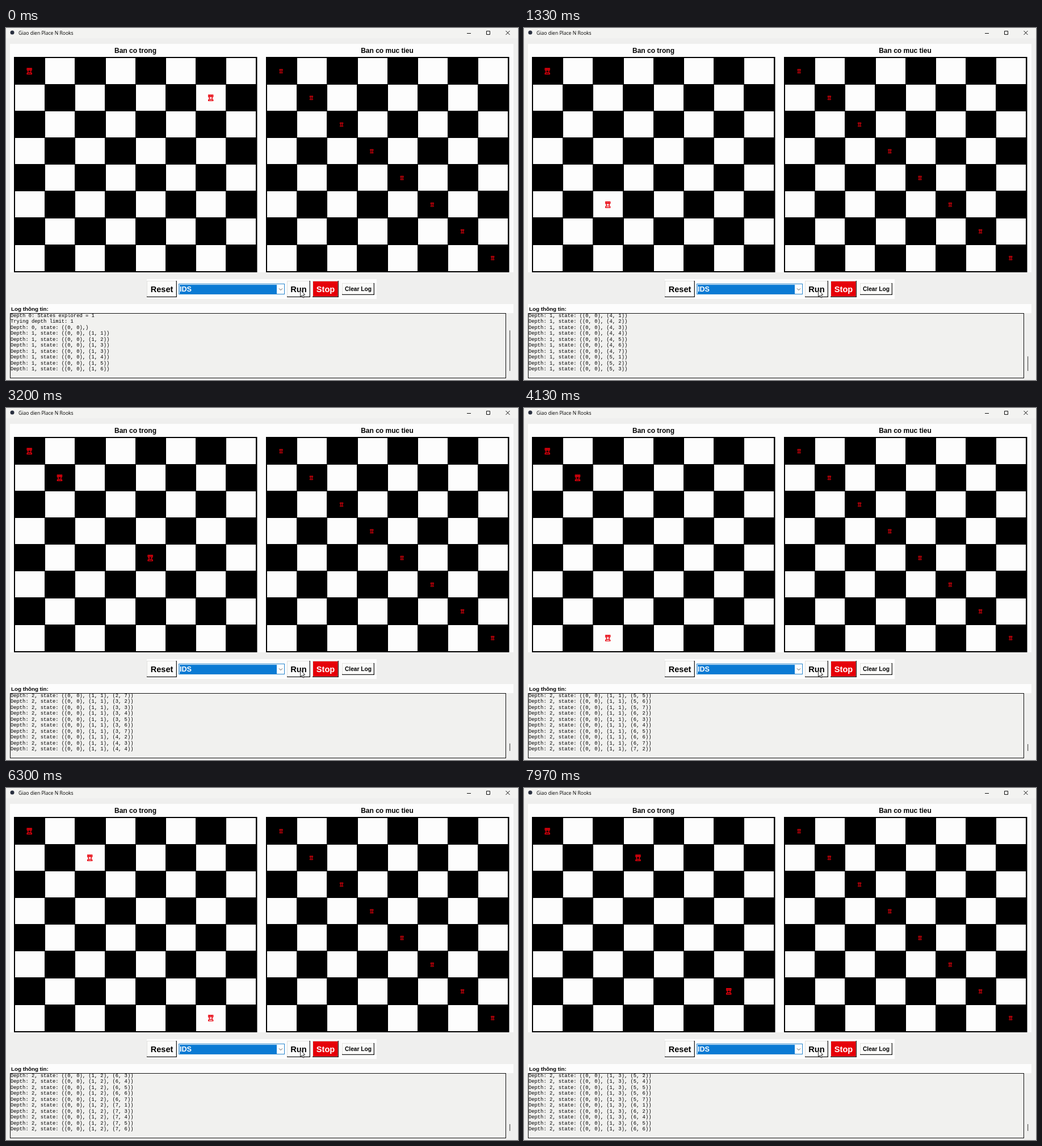
An HTML page for the animation above (8 s loop, 902 by 621 pixels).

```html
<!DOCTYPE html>
<html lang="vi">
<head>
<meta charset="utf-8">
<title>Giao dien Place N Rooks</title>
<style>
  html, body { margin: 0; width: 100%; height: 100%; overflow: hidden; background: #efefee; }
  svg { display: block; width: 902px; height: 621px; }
  text { font: bold 12px "Liberation Sans", Arial, sans-serif; }
  .big { font-size: 14.6px; }
  .title { font: 8.6px "Open Sans", sans-serif; }
  #log text { font: 8.8px "Liberation Mono", monospace; }
  .mid { text-anchor: middle; }
  .line { fill: none; stroke: #111; }
</style>
</head>
<body>
<svg viewBox="0 0 902 621">
  <defs>
    <clipPath id="logClip"><rect x="8" y="504" width="872" height="113"/></clipPath>
    <path id="rook" fill="none" stroke="#e8000c" stroke-width="1.4"
      d="M-4-4.8v2.8l1.5 1.2v3.4l-1.5 1.2v1.4h8v-1.4l-1.5-1.2v-3.4l1.5-1.2v-2.8h-2v1.3h-1v-1.3h-2v1.3h-1v-1.3zM-3.5-1.8h7M-2.5 2.6h5"/>
  </defs>
  <rect width="902" height="621" fill="#efefee"/>
  <rect width="902" height="18" fill="#f3f3f1"/>
  <circle cx="11" cy="8" r="3.5" fill="#2a3040"/>
  <text class="title" x="22" y="12">Giao dien Place N Rooks</text>
  <path class="line" d="M812 9.5h7M846.5 5.5h6v6h-6zM880.5 5l7 7m0-7l-7 7"/>

  <g fill="#fdfdfd">
    <rect x="7" y="28" width="887" height="403"/>
    <rect x="248" y="443" width="405" height="35"/>
    <rect x="7" y="487" width="887" height="16"/>
  </g>
  <text class="mid" x="228" y="43.5">Ban co trong</text>
  <text class="mid" x="671.5" y="43.5">Ban co muc tieu</text>
  <g id="boards"></g>
  <g id="rooks"></g>

  <g id="buttons"></g>
  <rect x="304.5" y="451.5" width="186" height="18" fill="#fff" stroke="#2584cc"/>
  <rect x="306" y="453" width="171" height="16" fill="#0a7ad4"/>
  <text x="306" y="465" fill="#fff" style="font-size:12.6px">IDS</text>
  <path class="line" d="M481 459.5l3 3l3-3" style="stroke:#555"/>
  <path d="M518.5 462v12.2l2.7-2.5l2 4.3l2-.9l-2-4.2h3.7z" fill="#fff" stroke="#111" stroke-width=".9"/>

  <text x="9" y="498.5" style="font-size:9.8px">Log thông tin:</text>
  <rect x="7.5" y="503.5" width="873" height="114" fill="#f1f1ef" stroke="#111"/>
  <g id="log" clip-path="url(#logClip)"></g>
  <rect id="thumb" x="887" width="1.2" fill="#555"/>
</svg>
<script>
const LOOP = 8000;
const LINE_HEIGHT = 10.5;
const BOARD_LAG = 0.3; // the board redraws shortly after the log line appears
// Search progress: [time in ms, step number]
const PACE = [[0, 5.4], [1330, 30.05], [2170, 45.6], [3200, 65.3], [3300, 66],
  [5000, 98.6], [6300, 122.3], [6370, 123], [8000, 154.1]];
const $ = id => document.getElementById(id);
const range = (from, to) => Array.from({ length: to - from }, (_, i) => from + i);

function rookAt([row, col], left, scale = 1) {
  return `<use href="#rook" transform="translate(${left + 53.25 * col} ${76 + 47.1 * row}) scale(${scale})"/>`;
}

function drawBoard(left) {
  let out = `<rect x="${left}" y="51" width="428.5" height="380"/>`;
  for (const row of range(0, 8)) for (const col of range(0, 8)) {
    if ((row + col) % 2 === 0) continue;
    const x = Math.round(left + 2 + 53.2 * col), y = Math.round(52.9 + 47.1 * row);
    out += `<rect x="${x}" y="${y}" width="52" height="46" fill="#fdfdfd"/>`;
  }
  return out;
}

function button(x, y, w, h, label, size, face = "#fbfbfa", ink = "#000") {
  return `<rect x="${x}" y="${y}" width="${w}" height="${h}" fill="#e2e2df"/>
    <path d="M${x} ${y + h}h${w}v${-h}h-1.5v${h - 1.5}h${1.5 - w}z" fill="#222"/>
    <rect x="${x + 1}" y="${y + 1}" width="${w - 2.5}" height="${h - 2.5}" fill="${face}"/>
    <text class="mid" x="${x + w / 2}" y="${y + h / 2 + size * 0.36}" fill="${ink}" style="font-size:${size}px">${label}</text>`;
}

// Iterative deepening: every visited state is one step and one log line.
const lines = [], steps = [];
function visit(state) {
  const cells = state.map(([r, c]) => `(${r}, ${c})`).join(", ");
  lines.push(`Depth: ${state.length - 1}, state: (${cells}${state.length === 1 ? "," : ""})`);
  steps.push({ state, lineCount: lines.length });
}
function search(state, limit) {
  visit(state);
  if (state.length > limit) return;
  for (const row of range(state.at(-1)[0] + 1, 8)) for (const col of range(0, 8)) {
    if (!state.some(([, used]) => used === col)) search([...state, [row, col]], limit);
  }
}
for (const limit of range(0, 3)) {
  const before = steps.length;
  lines.push(`Trying depth limit: ${limit}`);
  search([[0, 0]], limit);
  lines.push(`Depth ${limit}: States explored = ${steps.length - before}`);
}
// The log repeats one line early on.
const repeated = lines.findIndex(line => line.includes("(1, 3)"));
lines.splice(repeated, 0, lines[repeated]);
for (const step of steps) if (step.lineCount > repeated) step.lineCount++;
const FIRST = 2; // steps before the first depth-1 state

function progress(time) {
  const i = PACE.findIndex(([t]) => t > time);
  const [t0, s0] = PACE[i - 1], [t1, s1] = PACE[i];
  return FIRST + s0 + (s1 - s0) * (time - t0) / (t1 - t0);
}

function drawLog(count) {
  $("log").innerHTML = lines.slice(count - 10, count).map((line, i) =>
    `<text x="8" y="${604 - LINE_HEIGHT * (9 - i)}">${line}</text>`).join("");
  const height = Math.max(12, 91 * 11 / (count + 2));
  $("thumb").setAttribute("y", 605 - height);
  $("thumb").setAttribute("height", height);
}

function drawRooks(state) {
  $("rooks").innerHTML = state.map(cell => rookAt(cell, 41.2)).join("") +
    range(0, 8).map(i => rookAt([i, i], 484.6, 0.66)).join("");
}

$("boards").innerHTML = drawBoard(14) + drawBoard(458);
$("buttons").innerHTML = button(248, 446, 53, 29, "Reset", 14.6) +
  button(495, 446, 41, 29, "Run", 14.6) +
  button(540, 446, 46, 29, "Stop", 14.6, "#e60008", "#fff") +
  button(592, 450, 57, 21, "Clear Log", 10.2);

let logStep = -1, boardStep = -1;
function frame() {
  const at = progress(performance.now() % LOOP);
  const nextLog = Math.floor(at), nextBoard = Math.floor(at - BOARD_LAG);
  if (nextLog !== logStep) drawLog(steps[logStep = nextLog].lineCount);
  if (nextBoard !== boardStep) drawRooks(steps[boardStep = nextBoard].state);
  requestAnimationFrame(frame);
}
frame();
</script>
</body>
</html>
```
